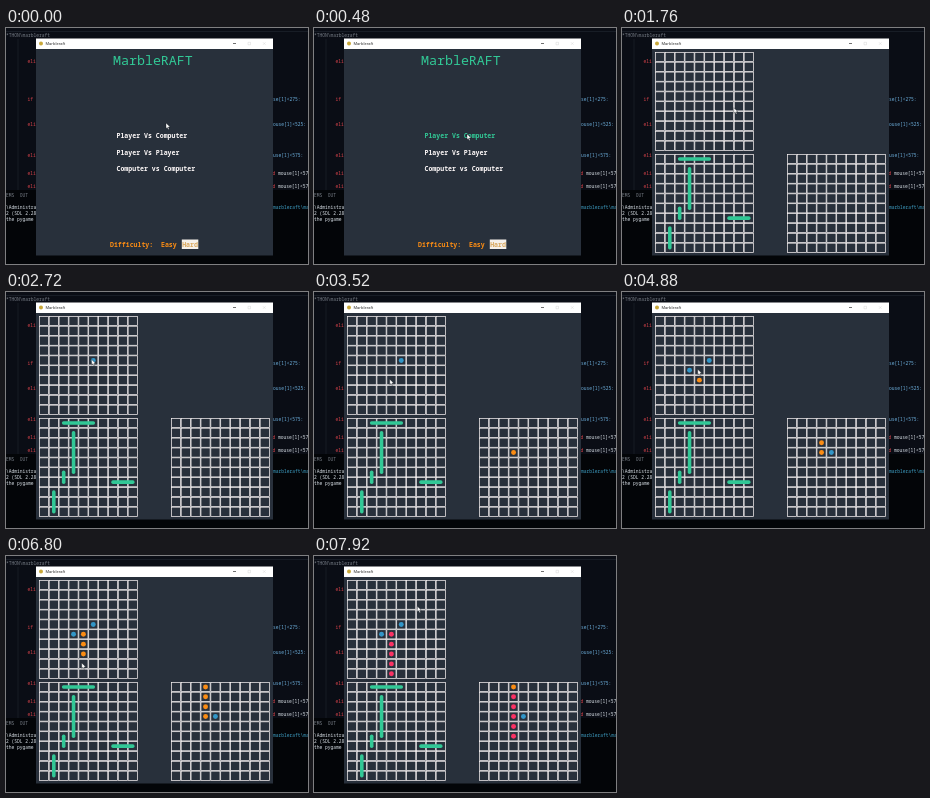
An HTML page for the animation above (8000 ms loop, 302 px wide and 236 px high).

```html
<!DOCTYPE html>
<html lang="en">
<head>
<meta charset="utf-8">
<style>
  html, body { margin: 0; width: 100%; height: 100%; overflow: hidden; background: #0a0d15; }
  svg { display: block; width: 100vw; height: 100vh; }
  text { font-family: "Noto Sans Mono", "DejaVu Sans Mono", monospace; white-space: pre; }
  .code { font-size: 4.6px; }
  .menu { font-size: 6.55px; font-weight: 600; }
  .bar { font: 4px "Open Sans", sans-serif; }
</style>
</head>
<body>
<svg viewBox="0 0 302 236">
  <rect width="302" height="236" fill="#0a0d15"/>
  <rect y="162" width="302" height="74" fill="#030508"/>
  <path d="M0 3.5H302M12 11V162" stroke="#272c36" stroke-width=".5"/>
  <g id="editor"></g>
  <rect x="30" y="20" width="237" height="207.5" fill="#28303b"/>
  <rect x="30" y="10.5" width="237" height="10.5" fill="#fff"/>
  <circle cx="35" cy="15.5" r="2" fill="#c9a83a"/>
  <text x="39.5" y="17" class="bar" fill="#222">Marbleraft</text>
  <path d="M227 15.5h3" stroke="#333" stroke-width=".7"/>
  <path d="M242 14.3h2.500v2.500h-2.500zM257 14.300l2.500 2.500m0-2.500l-2.500 2.500" fill="none" stroke="#ccc" stroke-width=".4"/>
  <g id="menu"></g>
  <g id="game"></g>
  <path id="cursor" d="M0 0v5.600l1.300-1.200 .9 2 1-.45-.9-1.950h1.800z" fill="#fff" stroke="#11151b" stroke-width=".35"/>
</svg>
<script>
const LOOP = 8000, TICK = 80, GAME_START = 800, REPLY = 80, GLIDE = 480;
const CELL = 9.87, BORDER = .7, PAD = 3.15;
const WHITE = '#fffafa', GREEN = '#32c896', BLUE = '#3296c8', ORANGE = '#fa8c14', RED = '#fa3264';
const KEYWORD = '#d9434b', NAME = '#6fb2e0', PLAIN = '#dce3ea', DIM = '#777d86';
const $ = id => document.getElementById(id);

function add(parent, tag, attrs, content = '') {
  const el = document.createElementNS('http://www.w3.org/2000/svg', tag);
  for (const key in attrs) el.setAttribute(key, attrs[key]);
  el.textContent = content;
  return parent.appendChild(el);
}
const label = (group, x, y, content, fill) =>
  add($(group), 'text', { x, y, fill, class: group === 'menu' ? 'menu' : 'code' }, content);

// Editor and terminal behind the window
label('editor', 0, 9, '*THON\\marbleraft', DIM);
for (const y of [35, 98, 129, 147, 160]) label('editor', 21.5, y, 'eli', KEYWORD);
label('editor', 21.5, 73, 'if', KEYWORD);
label('editor', 267, 73, 'se[1]<275:', NAME);
label('editor', 267, 98, 'ouse[1]<525:', NAME);
label('editor', 267, 129, 'use[1]<575:', NAME);
for (const y of [147, 160]) {
  label('editor', 266.5, y, 'd', KEYWORD);
  label('editor', 272, y, 'mouse[1]<575', PLAIN);
}
label('editor', 0, 169, 'EMS  OUT', DIM);
label('editor', 267, 180.5, 'marbleraft\\ma', '#3f9fc4');
['\\Administrator', '2 (SDL 2.28.3', 'the pygame c'].forEach((line, i) =>
  label('editor', 0, 180.5 + 6 * i, line, PLAIN));

// Menu
label('menu', 107, 37, 'MarbleRAFT', GREEN).style.cssText = 'font-size:13.3px;font-weight:400';
const [firstOption] = ['Player Vs Computer', 'Player Vs Player', 'Computer vs Computer']
  .map((option, i) => label('menu', 110.5, 110 + 16.5 * i, option, WHITE));
label('menu', 104, 218.5, 'Difficulty: ', ORANGE);
label('menu', 155, 218.5, 'Easy', ORANGE);
add($('menu'), 'rect', { x: 175.8, y: 211.5, width: 16.5, height: 9.5, fill: '#f5f0ea' });
label('menu', 176.2, 218.5, 'Hard', '#d9a860');

// Boards
const ENEMY = { x: 33, y: 24 }, OWN = { x: 33, y: 126 }, TARGET = { x: 165, y: 126 };
for (const board of [ENEMY, OWN, TARGET]) {
  for (let i = 0; i < 100; i++) {
    add($('game'), 'rect', {
      x: board.x + i % 10 * CELL + BORDER / 2, y: board.y + Math.floor(i / 10) * CELL + BORDER / 2,
      width: CELL - BORDER, height: CELL - BORDER,
      fill: 'none', stroke: WHITE, 'stroke-width': BORDER
    });
  }
}

function ship(col, row, cols, rows) {
  add($('game'), 'rect', {
    x: OWN.x + col * CELL + PAD, y: OWN.y + row * CELL + PAD,
    width: cols * CELL - 2 * PAD, height: rows * CELL - 2 * PAD, rx: 1.7, fill: GREEN
  });
}
ship(2, 0, 4, 1);
ship(3, 1, 1, 5);
ship(2, 5, 1, 2);
ship(1, 7, 1, 3);
ship(7, 6, 3, 1);

// Each round: click time, the player's cell, the computer's answer
const rounds = [
  [2720, [5, 4], [3, 3]],
  [3760, [4, 6], [4, 3]],
  [4400, [3, 5], [3, 2]],
  [5120, [4, 5], [3, 1]],
  [6160, [4, 7], [3, 0]],
  [6880, [4, 8], [3, 4]],
  [7760, [4, 9], [3, 5]]
];
const lastClick = rounds.at(-1)[0];
const center = (board, [col, row]) => [board.x + (col + .5) * CELL, board.y + (row + .5) * CELL];

// Both sides chase a five-cell upright ship, sunk by the last round
function shot(board, cell, time, shipCol, shipTop, sunkAt) {
  const [col, row] = cell, [cx, cy] = center(board, cell);
  const hit = col === shipCol;
  const sinks = hit && row >= shipTop && row < shipTop + 5;
  const dot = add($('game'), 'circle', { cx, cy, r: CELL / 4 });
  return t => {
    show(dot, t >= time);
    dot.setAttribute('fill', sinks && t >= sunkAt ? RED : hit ? ORANGE : BLUE);
  };
}
const shots = rounds.flatMap(([time, mine, theirs]) => [
  shot(ENEMY, mine, time, 4, 5, lastClick),
  shot(TARGET, theirs, time + REPLY, 3, 1, lastClick + REPLY)
]);

// Pointer: rests at each stop until its leave time, then glides to the next
const stops = [
  { leave: 0, x: 160, y: 95 },
  { leave: 1120, x: 153, y: 106 },
  { leave: 1520, x: 138, y: 92 },
  ...rounds.map(([leave, cell]) => {
    const [x, y] = center(ENEMY, cell);
    return { leave, x: x - 1.7, y: y - 1 };
  }),
  { leave: LOOP, x: 113, y: 27 }
];
function pointerAt(t) {
  const i = stops.findIndex(stop => stop.leave > t);
  const from = stops[i - 1], to = stops[i];
  const p = Math.min(1, (t - from.leave) / Math.min(GLIDE, to.leave - from.leave));
  const k = p * p * (3 - 2 * p);
  return [from.x + (to.x - from.x) * k, from.y + (to.y - from.y) * k];
}

function show(el, visible) {
  el.setAttribute('visibility', visible ? 'visible' : 'hidden');
}

const started = performance.now();
function draw() {
  const elapsed = (performance.now() - started) % LOOP;
  const t = Math.floor(elapsed / TICK) * TICK;
  const playing = t >= GAME_START;
  $('menu').style.display = playing ? 'none' : '';
  $('game').style.display = playing ? '' : 'none';
  const [x, y] = pointerAt(t);
  $('cursor').setAttribute('transform', `translate(${x} ${y})`);
  firstOption.setAttribute('fill', y > 102 ? GREEN : WHITE);
  for (const update of shots) update(t);
  requestAnimationFrame(draw);
}
draw();
</script>
</body>
</html>
```
